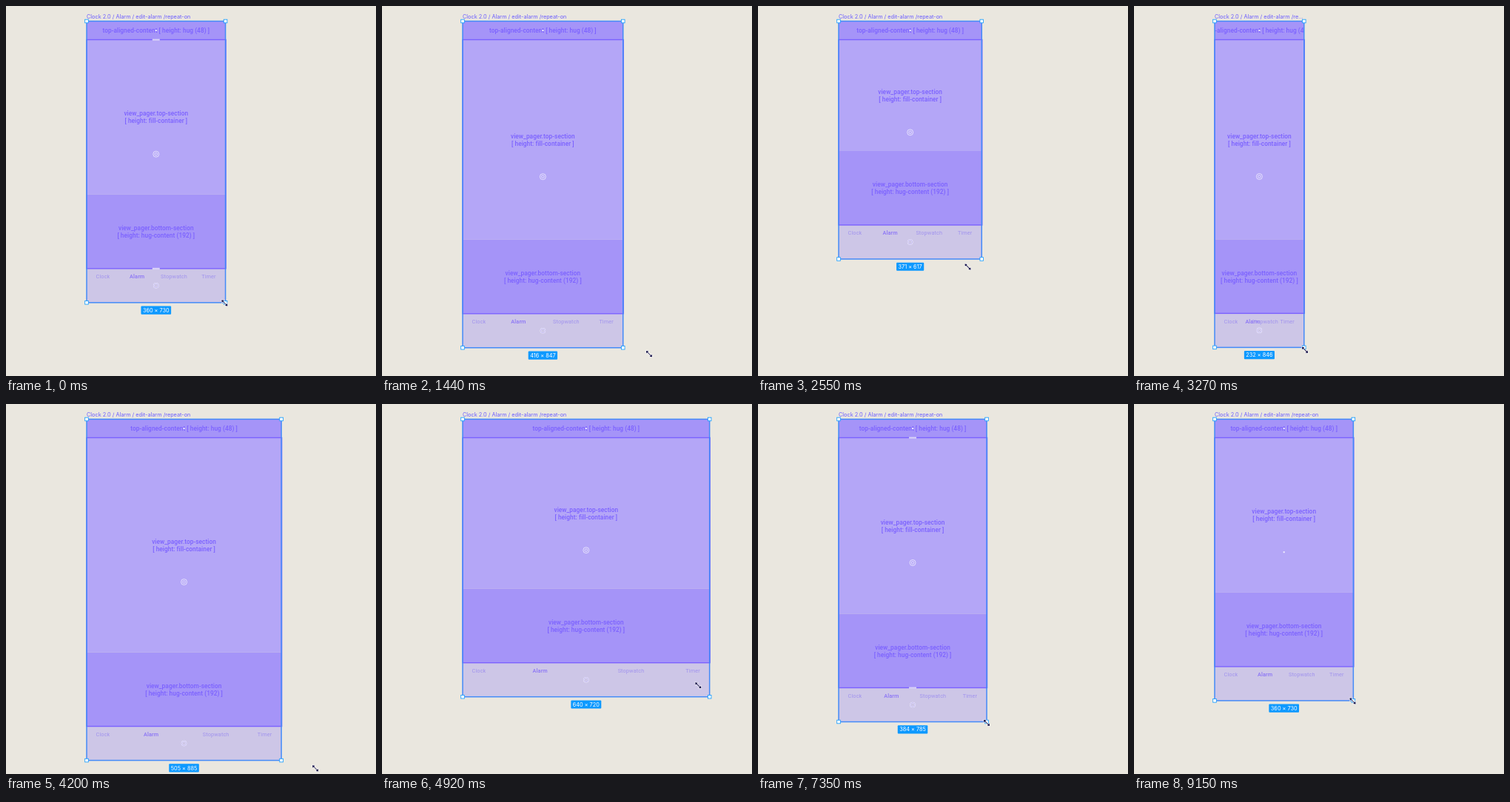
Recreate the animation shown at these times as an HTML page with a canvas. Size 500 by 500 pixels, loop 9180 ms.

```html
<!DOCTYPE html>
<html lang="en">
<head>
<meta charset="utf-8">
<title>Resizable layout</title>
<style>
  html, body { margin: 0; width: 100%; height: 100%; overflow: hidden; background: #eae7df; }
  canvas { display: block; width: 500px; height: 500px; }
</style>
</head>
<body>
<canvas id="stage"></canvas>
<script>
const LOOP = 9180, STEP = 30, REST = 9000, LAG = 110, SCALE = 0.521;
const LEFT = 109, TOP = 20.5, HEADER = 25, PANEL = 100, NAV = 46;
const PURPLE = '#7b61ff', BLUE = '#438af8', ACCENT = '#0d99ff', GLOW = 'rgba(255,255,255,.8)';
const INTER = 'Inter, sans-serif', ROBOTO = 'Roboto, sans-serif';
const SMALL = '7.3px ' + INTER;

// Turning points of the drag: time, frame width, frame height
const PATH = [
  [0, 360, 730], [900, 362, 752], [1440, 416, 847], [1600, 520, 858],
  [1870, 648, 755], [2550, 371, 617], [3200, 232, 838], [4000, 345, 832],
  [4200, 505, 885], [4400, 655, 905], [4600, 700, 825], [5200, 570, 660],
  [5760, 419, 720], [6100, 393, 780], [7350, 384, 785], [8000, 408, 790],
  [8400, 424, 710], [REST, 360, 730], [LOOP, 360, 730]
];

const canvas = document.getElementById('stage');
const ctx = canvas.getContext('2d');
const ratio = window.devicePixelRatio || 1;
canvas.width = canvas.height = 500 * ratio;

function slope(i, c) {
  const a = PATH[i - 1], b = PATH[i + 1];
  return a && b ? (b[c] - a[c]) / (b[0] - a[0]) : 0;
}

// Smooth curve through the turning points
function sizeAt(t) {
  const i = Math.max(0, PATH.findIndex(p => p[0] > t) - 1);
  const a = PATH[i], b = PATH[i + 1], span = b[0] - a[0];
  const u = (t - a[0]) / span, v = 1 - u;
  return [1, 2].map(c => a[c] * v * v * (1 + 2 * u) + b[c] * u * u * (3 - 2 * u)
    + span * u * v * (slope(i, c) * v - slope(i + 1, c) * u));
}

function fill(x, y, w, h, color) {
  ctx.fillStyle = color;
  ctx.fillRect(x, y, w, h);
}

function outline(x, y, w, h, color, width) {
  ctx.strokeStyle = color;
  ctx.lineWidth = width;
  ctx.strokeRect(x, y, w, h);
}

function text(str, x, y, font, color, align = 'center', spacing = 0) {
  ctx.font = font;
  ctx.letterSpacing = spacing + 'px';
  ctx.textAlign = align;
  ctx.fillStyle = color;
  ctx.fillText(str, x, y);
}

function measure(str, font) {
  ctx.font = font;
  ctx.letterSpacing = '0px';
  return ctx.measureText(str).width;
}

function ring(x, y, r, width, color = GLOW) {
  ctx.strokeStyle = color;
  ctx.lineWidth = width;
  ctx.beginPath();
  ctx.arc(x, y, r, 0, 7);
  ctx.stroke();
}

function title(room) {
  const full = 'Clock 2.0 / Alarm / edit-alarm /repeat-on';
  let str = full, n = full.length;
  while (measure(str, SMALL) > room && n > 1) str = full.slice(0, --n) + '…';
  text(str, LEFT, 17.4, SMALL, '#6b5cff', 'left');
}

function pointer(x, y) {
  ctx.save();
  ctx.translate(x, y);
  ctx.rotate(Math.PI / 4);
  ctx.beginPath();
  for (const s of [1, -1]) {
    ctx.lineTo(-3 * s, 0.4 * s);
    ctx.lineTo(-3 * s, 2.1 * s);
    ctx.lineTo(-5.8 * s, 0);
    ctx.lineTo(-3 * s, -2.1 * s);
    ctx.lineTo(-3 * s, -0.4 * s);
  }
  ctx.closePath();
  ctx.strokeStyle = GLOW;
  ctx.lineWidth = 1.3;
  ctx.stroke();
  ctx.fillStyle = '#17134a';
  ctx.fill();
  ctx.restore();
}

function draw(t) {
  const [w, h] = sizeAt(t);
  const [dx, dy] = sizeAt(Math.min(t + LAG, LOOP - 1)).map((s, i) => (s - [w, h][i]) * SCALE);
  const width = w * SCALE, height = h * SCALE;
  const right = LEFT + width, bottom = TOP + height, mid = LEFT + width / 2;
  const pagerTop = TOP + HEADER, navTop = bottom - NAV, panelTop = navTop - PANEL;
  const label = (str, y) => text(str, mid, y + 3, '500 8.33px ' + ROBOTO, PURPLE, 'center', 0.04);

  ctx.setTransform(ratio, 0, 0, ratio, 0, 0);
  fill(0, 0, 500, 500, '#eae7df');
  title(width);

  ctx.save();
  ctx.beginPath();
  ctx.rect(LEFT, TOP, width, height);
  ctx.clip();
  fill(LEFT, TOP, width, HEADER, '#a594f8');
  fill(LEFT, pagerTop, width, panelTop - pagerTop, '#b4a6f7');
  fill(LEFT, panelTop, width, PANEL, '#a594f8');
  fill(LEFT, navTop, width, NAV, '#cdc6e7');

  label('top-aligned-content [ height: hug (48) ]', 33);
  const upper = (pagerTop + panelTop) / 2, lower = panelTop + PANEL / 2;
  label('view_pager.top-section', upper - 4.8);
  label('[ height: fill-container ]', upper + 5.2);
  label('view_pager.bottom-section', lower - 4.8);
  label('[ height: hug-content (192) ]', lower + 5.2);

  const tab = (name, x, share, weight, color) => text(name, x + (width - 187.6) * share,
    navTop + 13.2, weight + ' 7.3px ' + ROBOTO, color, 'center', 0.13);
  tab('Clock', 131, 0, 400, '#a193ee');
  tab('Alarm', 177.2, 0.25, 500, '#8a73f6');
  tab('Stopwatch', 227, 0.75, 400, '#a193ee');
  tab('Timer', 274, 1, 400, '#a193ee');
  ctx.restore();

  outline(LEFT, pagerTop, width + 0.5, navTop - pagerTop, PURPLE, 1.4);
  outline(LEFT, TOP, width, height, BLUE, 1.5);

  // Auto-layout markers
  const center = (pagerTop + navTop) / 2, settled = t >= REST;
  fill(mid - 1, 32, 2, 2, GLOW);
  if (settled) {
    fill(mid - 1, center - 1, 2, 2, GLOW);
  } else {
    ring(mid, center, 4, 0.8);
    ring(mid, center, 1.8, 0.8);
    ring(mid, navTop + NAV / 2, 3, 1.6);
    ring(mid, navTop + NAV / 2, 3, 0.6, '#a193ee');
  }
  if (!settled && Math.hypot(dx, dy) < 2) {
    for (const y of [pagerTop, navTop]) fill(mid - 5, y - 1, 10, 2.2, '#d9d2f7');
  }

  for (const x of [LEFT, right]) for (const y of [TOP, bottom]) {
    fill(x - 2.3, y - 2.3, 4.6, 4.6, '#fff');
    outline(x - 2.3, y - 2.3, 4.6, 4.6, ACCENT, 0.8);
  }

  const size = Math.round(w) + ' × ' + Math.round(h);
  const badge = measure(size, SMALL) + 5;
  ctx.fillStyle = ACCENT;
  ctx.beginPath();
  ctx.roundRect(mid - badge / 2, bottom + 4.7, badge, 11.2, 1);
  ctx.fill();
  text(size, mid, bottom + 13, SMALL, '#fff');

  pointer(right + dx - 1, bottom + dy + 0.5);
}

const start = performance.now();
function tick() {
  const t = (performance.now() - start) % LOOP;
  draw(Math.floor(t / STEP) * STEP);
  requestAnimationFrame(tick);
}
tick();
</script>
</body>
</html>
```
